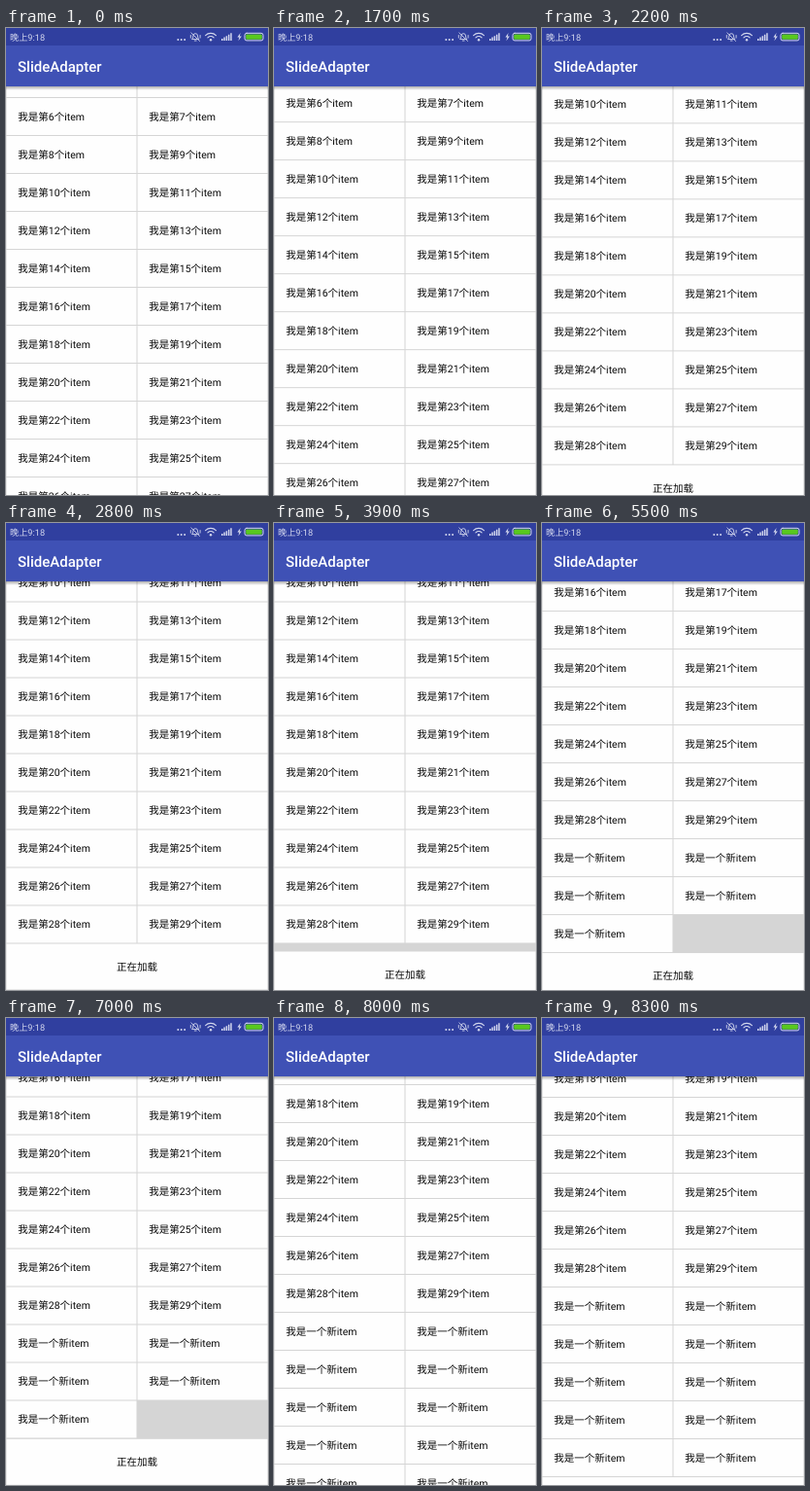
Recreate the animation shown at these times as an HTML page. Size 270 by 480 pixels, loop 8500 ms.

```html
<!DOCTYPE html>
<html lang="zh">
<head>
<meta charset="utf-8">
<title>SlideAdapter</title>
<style>
  html, body { margin: 0; width: 100%; height: 100%; overflow: hidden; background: #d5d5d5; }
  svg { display: block; width: 270px; height: 480px; }
  text { font-family: Roboto, "Noto Sans CJK SC", "Noto Sans CJK", sans-serif; text-rendering: geometricPrecision; }
  #list text { font-size: 10.5px; fill: #0a0a0a; }
</style>
</head>
<body>
<svg viewBox="0 0 270 480">
  <defs>
    <linearGradient id="shade" x1="0" y1="0" x2="0" y2="1">
      <stop offset="0" stop-color="#000" stop-opacity=".32"/>
      <stop offset="1" stop-color="#000" stop-opacity="0"/>
    </linearGradient>
  </defs>
  <rect width="270" height="480" fill="#d5d5d5"/>
  <g id="list"></g>

  <rect y="60" width="270" height="4" fill="url(#shade)"/>
  <rect y="18" width="270" height="42" fill="#3f51b5"/>
  <rect width="270" height="18" fill="#303f9f"/>
  <text x="12" y="45.3" font-size="15" font-weight="500" fill="#fff">SlideAdapter</text>
  <text x="4" y="12.8" font-size="9.2" fill="#d3d7ee">晚上9:18</text>

  <g fill="#d3d7ee">
    <circle cx="177.3" cy="12" r="1"/>
    <circle cx="180.7" cy="12" r="1"/>
    <circle cx="184.1" cy="12" r="1"/>
    <circle cx="211" cy="12.3" r="1.2"/>
    <path d="M222 11h1.5v2H222zM224.3 9.6h1.5V13h-1.5zM226.6 8.2h1.5V13h-1.5zM228.9 6.8h1.5V13h-1.5zM231.2 5.2h1.5V13h-1.5z"/>
    <path d="M241.6 5l-3.2 4.6h2l-1 3.6 3.4-4.8h-2z"/>
  </g>
  <g fill="none" stroke="#d3d7ee" stroke-width="1.1" stroke-linecap="round">
    <path d="M205.6 7.6a7.6 7.6 0 0 1 10.8 0M207.9 9.9a4.4 4.4 0 0 1 6.2 0"/>
    <path d="M191.9 11.3q1-1 1-3.3a2.3 2.3 0 0 1 4.6 0q0 2.300 1 3.300zM194.300 13h1.800M190.800 5l8.800 8.400M190.300 7.500v2.600M200.100 7.500v2.600" stroke-width=".9"/>
    <rect x="246" y="5.300" width="19" height="7.600" rx="2" stroke-width="1"/>
  </g>
  <rect x="247.200" y="6.500" width="16.600" height="5.200" rx="1" fill="#58c81e"/>
</svg>
<script>
const LOOP = 8500, STEP = 100, ROW = 39, FOOT = 48;
const FIRST = 4, BASE = 30, BATCH = 5, LAST = BASE + 2 * BATCH;
const list = document.getElementById('list');

function add(parent, tag, attrs, label) {
  const el = document.createElementNS('http://www.w3.org/2000/svg', tag);
  for (const k in attrs) el.setAttribute(k, attrs[k]);
  if (label) el.textContent = label;
  return parent.appendChild(el);
}

function cell(x, y, w, h, label, centered) {
  const g = add(list, 'g', { transform: `translate(${x} ${y})` });
  add(g, 'rect', { x: .5, y: .5, width: w - 1, height: h - 1, fill: '#fefefe' });
  add(g, 'text', {
    x: centered ? w / 2 : 12.3, y: h / 2 + 3.7,
    'text-anchor': centered ? 'middle' : 'start'
  }, label);
  return g;
}

const batches = [[], []];
for (let i = FIRST; i < LAST; i++) {
  const label = i < BASE ? `我是第${i}个item` : '我是一个新item';
  const g = cell(i % 2 * 135, Math.floor(i / 2) * ROW, 135, ROW, label);
  if (i >= BASE) batches[Math.floor((i - BASE) / BATCH)].push(g);
}
const footer = cell(0, 0, 270, FOOT, '正在加载', true);

const part = (t, start, dur) => Math.min(1, Math.max(0, (t - start) / dur));
const easeOut = p => Math.sin(p * Math.PI / 2);
const easeBoth = p => (1 - Math.cos(p * Math.PI)) / 2;

function render(t) {
  const top = -45.5
    - 107.5 * easeOut(part(t, 1626, 899))
    - 117 * easeOut(part(t, 4928, 772))
    - 38.5 * easeOut(part(t, 7920, 380));
  list.setAttribute('transform', `translate(0 ${top.toFixed(2)})`);

  // Each load pushes the footer down, then the new cells fade in.
  const row = 15 + 3 * easeBoth(part(t, 3858, 250)) + 2 * easeBoth(part(t, 6990, 250));
  footer.setAttribute('transform', `translate(0 ${(row * ROW).toFixed(2)})`);
  [4140, 7245].forEach((start, n) => {
    const alpha = easeBoth(part(t, start, 120));
    batches[n].forEach(g => g.setAttribute('opacity', alpha));
  });
}

const began = performance.now();
function tick() {
  const t = (performance.now() - began) % LOOP;
  render(Math.floor(t / STEP) * STEP);
  requestAnimationFrame(tick);
}
tick();
</script>
</body>
</html>
```
